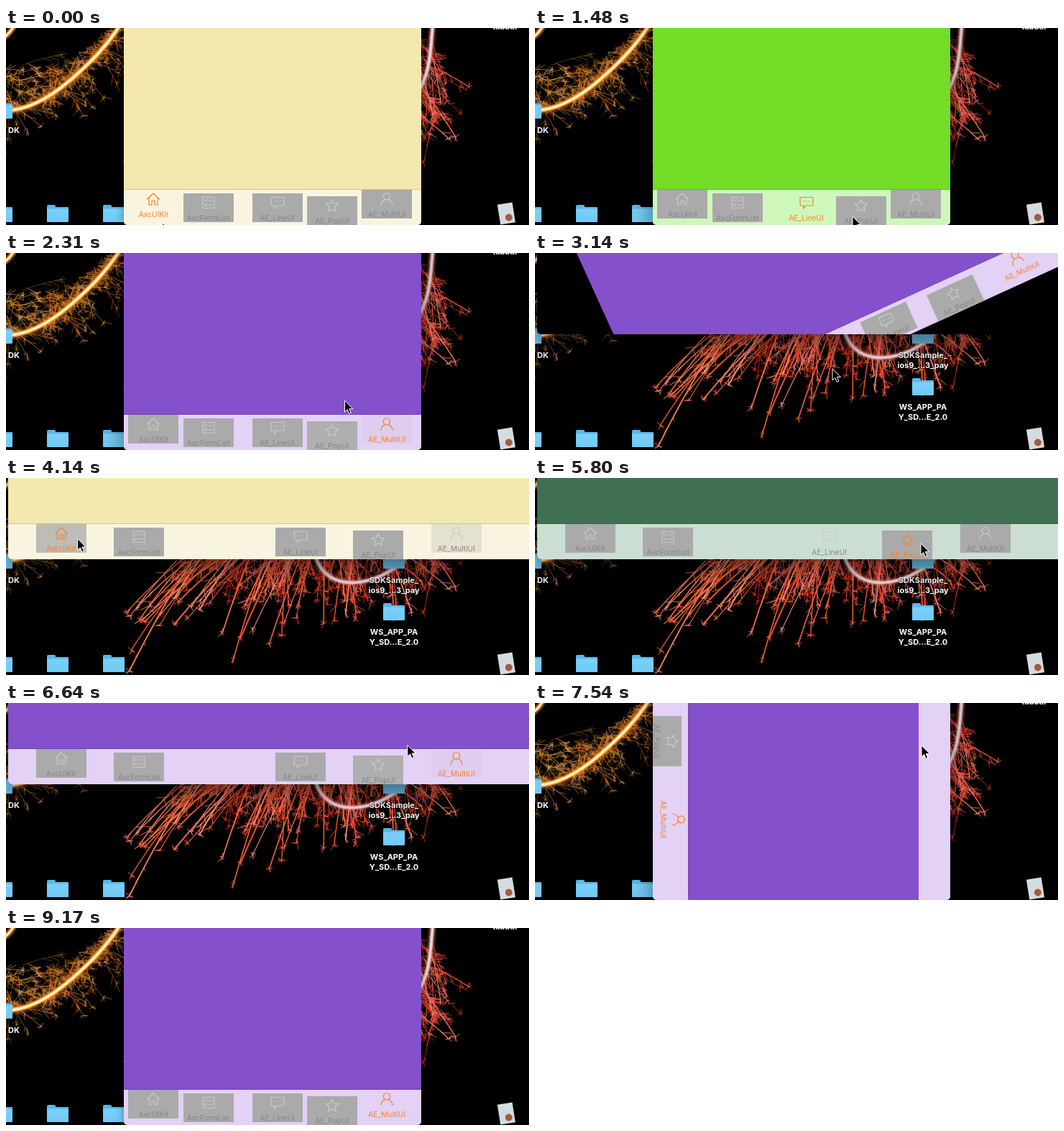
Animation, 728 px wide and 274 px high, one loop 9270 ms. Source, as an HTML page with a canvas:

```html
<!DOCTYPE html>
<html lang="en">
<head>
<meta charset="utf-8">
<title>Tab bar rotation</title>
<style>
html, body { margin: 0; width: 100%; height: 100%; overflow: hidden; background: #000; }
#stage { position: relative; width: 728px; height: 274px; overflow: hidden; font-family: Inter, "Liberation Sans", sans-serif; }
#stage *, #sky { position: absolute; }
#sky { left: 0; top: 0; }
.folder { width: 30px; height: 21px; border-radius: 1px; background: linear-gradient(#58b8e6 2px, #7ad0f9 3px, #6fcaf7); }
.folder::before { content: ""; position: absolute; left: 0; top: -3px; width: 12px; height: 4px; border-radius: 2px 2px 0 0; background: #58b8e6; }
.folder span { left: -35px; top: 30px; width: 100px; font: 700 11px/14px Inter, "Liberation Sans", sans-serif; color: #fff; text-align: center; text-shadow: 0 1px 2px #000; white-space: pre; }
#paper { left: 686px; top: 244px; width: 21px; height: 28px; background: #d3dde0; transform: rotate(-9deg); }
#paper i { left: 8px; top: 15px; width: 10px; height: 10px; border-radius: 50%; background: #a85b38; }
#win { background: #000; border-radius: 5px; overflow: hidden; }
#nav, #bar { left: 0; width: 100%; }
#nav { top: 0; }
#bar { bottom: 0; height: 49px; box-shadow: 0 -.5px rgba(0,0,0,.3); }
.item { width: 70px; height: 40px; margin-left: -35px; }
.item svg { left: 25px; top: 3px; width: 20px; height: 20px; fill: none; stroke: currentColor; stroke-width: 1.2; stroke-linejoin: round; stroke-linecap: round; }
.item span { left: 0; width: 70px; top: 26.6px; font-size: 10.2px; line-height: 14px; text-align: center; white-space: nowrap; }
#cursor { left: -1px; top: -1px; width: 15px; height: 21px; }
</style>
</head>
<body>
<div id="stage">
  <canvas id="sky" width="728" height="274"></canvas>
  <div id="desk"></div>
  <div id="paper"><i></i></div>
  <div id="win"><div id="page"><div id="nav"></div><div id="bar"></div></div></div>
  <svg id="cursor" viewBox="-1 -1 15 21"><path d="M0 0V16L3.7 12.6L6.2 18.4L8.8 17.3L6.3 11.6H11.4Z" fill="#000" stroke="#fff"/></svg>
</div>
<script>
const LOOP = 9270, FADE = 200, TURN = 355, TO_WIDE = 2910, TO_TALL = 7540;
const LONG = 736, SHORT = 414, MID_X = 371, MID_Y = -94;
const $ = id => document.getElementById(id);
const lerp = (a, b, k) => a + (b - a) * k;
const clamp = v => Math.min(1, Math.max(0, v));
const ease = k => (1 - Math.cos(Math.PI * clamp(k))) / 2;

// shift: sideways offset from the even spacing, drop: offset from the bar's top
const tabs = [
  { name: "AxcUIKit", shift: 0, drop: 0, page: "#f3e8af", bar: "#f9f4df",
    icon: "M1.5 10L10 2L18.5 10M4 8V18H8V12H12V18H16V8" },
  { name: "AxcFormList", shift: -1, drop: 5, page: "#8079c9", bar: "#dfdbf7",
    icon: "M2 2.5H18V17.5H2ZM4.5 6.5L6 8L8 5.5M10 7H15.5M4.5 12.5L6 14L8 11.5M10 13H15.5" },
  { name: "AE_LineUI", shift: 1, drop: 5, page: "#73dd27", bar: "#cff7bb",
    icon: "M2 2.5H18Q19 2.5 19 3.5V13Q19 14 18 14H9L5.5 18V14H2Q1 14 1 13V3.5Q1 2.5 2 2.5ZM5.5 8H6.5M9.5 8H10.5M13.5 8H14.5" },
  { name: "AE_PopUI", shift: 0, drop: 9, page: "#3f7052", bar: "#cbded3",
    icon: "M10 1.5L12.5 7L18.5 7.7L14 11.7L15.3 17.8L10 14.7L4.7 17.8L6 11.7L1.5 7.7L7.5 7Z" },
  { name: "AE_MultiUI", shift: -1, drop: 0, page: "#8550cb", bar: "#e3d1f6",
    icon: "M10 1.5A4.8 4.8 0 1 1 9.9 1.5ZM2 18.5C2.5 14 5 11.5 7.5 10.6M12.5 10.6C15 11.5 17.5 14 18 18.5" }
];

// Pointer moves; a move with a tab starts with a click on it
const moves = [
  { at: 130, end: 420, x: 257, y: 256 },
  { at: 600, end: 1010, x: 377, y: 258, tab: 1 },
  { at: 1250, end: 1480, x: 442, y: 262, tab: 2 },
  { at: 1780, end: 1950, x: 530, y: 250, tab: 3 },
  { at: 2130, end: 2490, x: 414, y: 161, tab: 4 },
  { at: 3400, end: 3910, x: 93, y: 84 },
  { at: 4090, end: 4380, x: 182, y: 88, tab: 0 },
  { at: 4480, end: 4870, x: 421, y: 86, tab: 1 },
  { at: 5110, end: 5630, x: 537, y: 91, tab: 2 },
  { at: 5800, end: 6160, x: 612, y: 85, tab: 3 },
  { at: 6460, end: 6700, x: 550, y: 54, tab: 4 },
  { at: 6960, end: 7060, x: 538, y: 59 },
  { at: 8010, end: 8220, x: 700, y: 280 }
];
const clicks = [{ at: -FADE, tab: 0 }, ...moves.filter(m => "tab" in m)];

for (const tab of tabs) {
  tab.el = document.createElement("div");
  tab.el.className = "item";
  tab.el.style.top = tab.drop + "px";
  tab.el.innerHTML = `<svg viewBox="0 0 20 20"><path d="${tab.icon}"/></svg><span>${tab.name}</span>`;
  $("bar").append(tab.el);
}

function addFolder(x, y, label = "") {
  $("desk").innerHTML += `<div class="folder" style="left:${x}px;top:${y}px"><span>${label}</span></div>`;
}
for (let i = 0; i < 3; i++) addFolder(78 * i - 21, 249);
addFolder(-21, 105, "Demo DK");
addFolder(525, 105, "SDKSample_\nios9_...3_pay");
addFolder(525, 177, "WS_APP_PA\nY_SD...E_2.0");
addFolder(680, -39, "tabbar");

function drawSky() {
  const c = $("sky").getContext("2d");
  let seed = 11;
  const rnd = () => (seed = seed * 16807 % 2147483647) / 2147483647;
  const between = (a, b) => lerp(a, b, rnd());
  const line = (x, y, angle, len) => {
    c.moveTo(x, y);
    c.lineTo(x + Math.cos(angle) * len, y + Math.sin(angle) * len);
  };
  // A curved streak with twigs along it and a small star at its tip
  const spark = (x, y, angle, len, color, width, twigs) => {
    const dx = Math.cos(angle) * len, dy = Math.sin(angle) * len, sag = len * .06;
    c.strokeStyle = color;
    c.lineWidth = width;
    c.beginPath();
    c.moveTo(x, y);
    c.quadraticCurveTo(x + dx / 2, y + dy / 2 - sag, x + dx, y + dy);
    c.stroke();
    c.lineWidth = Math.min(width, .9);
    c.beginPath();
    for (let i = 0; i < twigs; i++) {
      const s = rnd();
      line(x + dx * s, y + dy * s - 2 * s * (1 - s) * sag, angle + between(-1, 1), between(4, 16));
    }
    for (let i = 0; i < 6; i++) line(x + dx, y + dy, rnd() * 6.3, between(2, 7));
    c.stroke();
  };
  const glow = (path, layers) => {
    for (const [width, color] of layers) {
      c.lineWidth = width;
      c.strokeStyle = color;
      c.stroke(new Path2D(path));
    }
  };
  c.lineCap = "round";

  // red burst: a dense core, then longer streaks that reach furthest at the left
  const outward = (x, y, spread) => Math.atan2(y + 130, x - 470) + between(-spread, spread);
  for (let i = 0; i < 300; i++) {
    const x = between(265, 602), y = between(10, 125);
    spark(x, y, outward(x, y, .7), between(20, 75), `hsl(${between(3, 13)},${between(65, 90)}%,${between(42, 66)}%)`, between(.5, 1.4), 5);
  }
  for (let i = 0; i < 48; i++) {
    const k = rnd(), x = lerp(235, 600, k), y = lerp(115, 35, k * k);
    spark(x, y, outward(x, y, .3), between(50, lerp(190, 125, k)), `hsl(${lerp(15, 5, k)},88%,${between(56, 72)}%)`, between(1, 2.1), 3);
  }
  glow("M430 106C445 165 520 150 556 112S590 40 594 -4",
    [[11, "rgba(240,110,100,.3)"], [6, "rgba(245,170,165,.7)"], [3, "#e4dce4"]]);

  // golden arc and the sparks around it
  for (let i = 0; i < 150; i++) {
    const u = rnd(), x = u * 150 - 8, y = 114 - 112 * u * u - rnd() * 80 * (1 - u);
    spark(x, y, between(-.4, 2.2), 8 + rnd() * rnd() * 80, `hsla(${between(20, 38)},${between(60, 90)}%,${between(38, 66)}%,.7)`, between(.4, 1), 3);
  }
  glow("M-5 114C25 117 60 98 90 72S140 25 159 -4",
    [[15, "rgba(230,100,20,.25)"], [8, "rgba(255,140,30,.6)"], [4.5, "#ffd267"], [2.2, "#fffbe0"]]);
  glow("M-4 14Q5 8 12 -4", [[9, "rgba(255,140,30,.5)"], [4, "#ffe29a"]]);
}

// Centres a box; coordinates are relative to its parent
function place(el, cx, cy, w, h) {
  Object.assign(el.style, { left: cx - w / 2 + "px", top: cy - h / 2 + "px", width: w + "px", height: h + "px" });
}

function drawWindow(t, land) {
  const wide = t >= TO_WIDE && t < TO_TALL;
  const left = wide ? 1 - land : land;
  const angle = (wide ? -90 : 90) * left;
  const ww = wide ? LONG : SHORT, wh = LONG + SHORT - ww;
  const w = lerp(SHORT, LONG, land), h = LONG + SHORT - w;
  place($("win"), MID_X, MID_Y, ww, wh);
  place($("page"), ww / 2, wh / 2, w, h);
  $("page").style.transform = angle ? `rotate(${angle}deg)` : "none";
  $("nav").style.height = lerp(64, 44, land) + "px";
  const active = t >= 600 && t < 9170;
  $("win").style.boxShadow = active ? "0 14px 32px rgba(0,0,0,.5)" : "0 6px 14px rgba(0,0,0,.35)";
  return w;
}

function drawTabs(t, land, width) {
  const [last, now] = [null, ...clicks.filter(k => k.at <= t)].slice(-2);
  const fade = clamp((t - now.at) / FADE);
  $("page").style.background = tabs[now.tab].page;
  $("nav").style.background = $("bar").style.background = tabs[now.tab].bar;
  tabs.forEach((tab, i) => {
    const on = i === now.tab;
    const gray = on ? 1 - fade : last && i === last.tab ? fade : 1;
    const [icon, text] = tab.el.children;
    tab.el.style.left = width * (i + .5) / tabs.length + tab.shift * lerp(6.5, 38.5, land) + "px";
    tab.el.style.background = `rgba(170,170,170,${gray})`;
    icon.style.color = on ? "#fa8128" : "#cacaca";
    text.style.color = on ? "#fa8128" : "#858585";
  });
}

function drawCursor(t) {
  let x = 218, y = 271;
  for (const m of moves) {
    const k = ease((t - m.at) / (m.end - m.at));
    x = lerp(x, m.x, k);
    y = lerp(y, m.y, k);
  }
  $("cursor").style.transform = `translate(${x}px,${y}px)`;
}

function draw(t) {
  const land = ease((t - TO_WIDE) / TURN) - ease((t - TO_TALL) / TURN);
  const width = drawWindow(t, land);
  drawTabs(t, land, width);
  drawCursor(t);
}

drawSky();
const start = performance.now();
function tick() {
  draw((performance.now() - start) % LOOP);
  requestAnimationFrame(tick);
}
tick();
</script>
</body>
</html>
```
